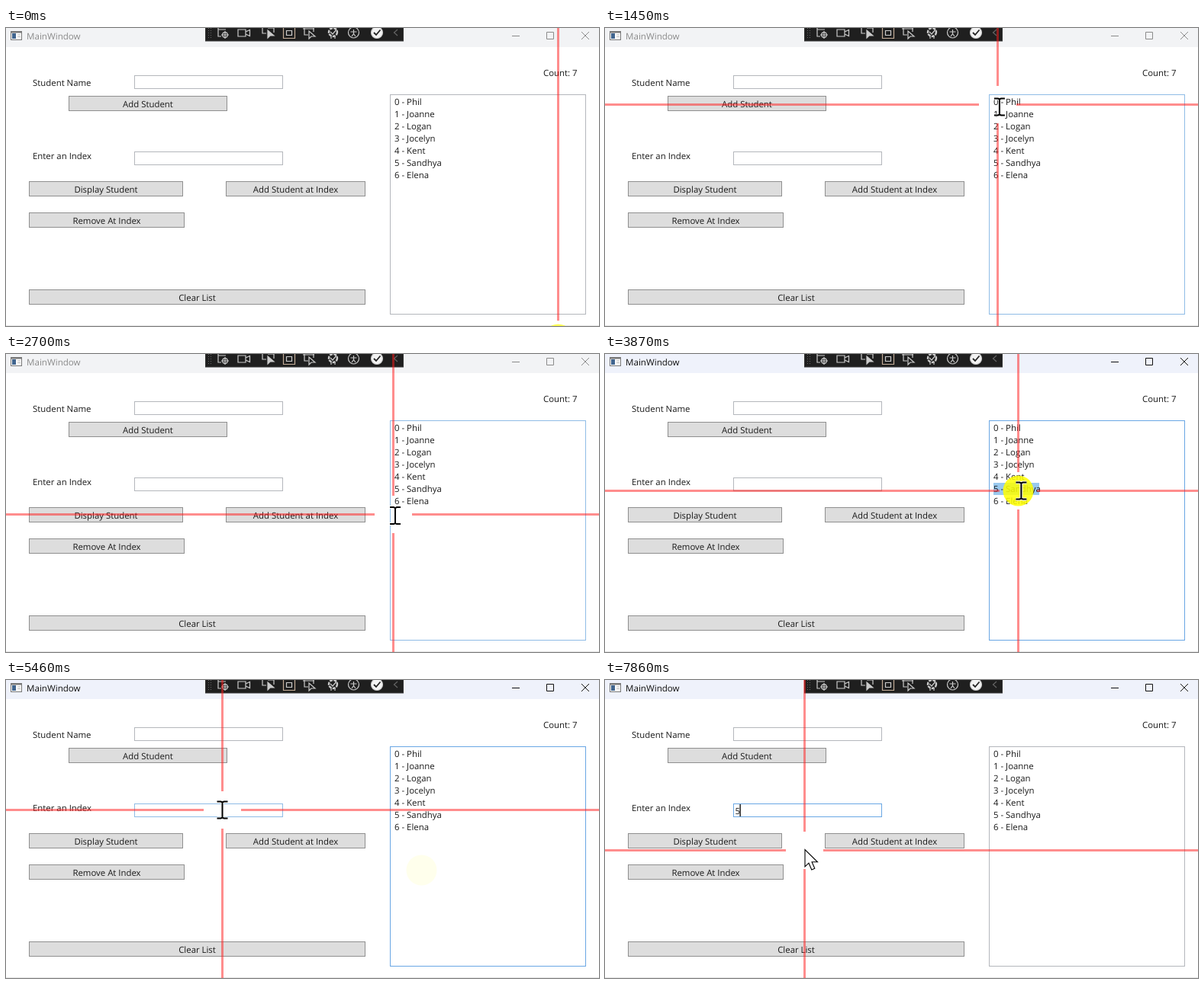
An HTML page that plays this animation: 777x391 px, repeating every 8 s.

```html
<!DOCTYPE html>
<html lang="en">
<head>
<meta charset="utf-8">
<title>Student list</title>
<style>
  html, body { margin: 0; width: 100%; height: 100%; overflow: hidden; background: #fff; }
  svg { display: block; width: 777px; height: 391px; }
  text { font: 11.4px "Open Sans", "Noto Sans", sans-serif; fill: #1a1a1a; text-rendering: geometricPrecision; }
  .box { fill: #fff; stroke: #b4b7bc; }
  .box.hover { stroke: #8fbce6; }
  .box.focus { stroke: #6aa7e4; }
  .button { fill: #ddd; stroke: #8f8f8f; }
  .button.hover { fill: #bee6fd; stroke: #5f97be; }
  .bar { fill: #f2f3f5; }
  .caption { fill: #8b8b8b; font-size: 11.6px; }
  .window { fill: none; stroke: #8b8b8b; }
  .active .bar { fill: #eff2fb; }
  .active .caption { fill: #111; }
  .active .window { stroke: #111; }
  .icons { fill: none; stroke: #cbcbcb; stroke-width: 1.2; }
</style>
</head>
<body>
<svg id="stage" viewBox="0 0 777 391">
  <defs><path id="beamShape" fill="none" d="M-7 -11H-2L0 -10L2 -11H7M0 -10V10M-7 11H-2L0 10L2 11H7"/></defs>
  <rect class="bar" width="777" height="25"/>
  <path d="M0 390.5H777" stroke="#e6e6e6"/>
  <rect x="6.5" y="4.5" width="14" height="11" fill="#fff" stroke="#777"/>
  <path d="M6 5.5H21" stroke="#777" stroke-width="2"/>
  <rect x="8" y="7" width="5" height="7" fill="#41658f"/>
  <path d="M15 9H19M15 11.5H19" stroke="#bbb"/>
  <text class="caption" x="27" y="15">MainWindow</text>
  <path class="window" d="M663 10.5h10M708.5 5.5h9v9h-9zM754 5l10 10m0 -10l-10 10"/>

  <text x="35" y="76">Student Name</text>
  <text x="35" y="172">Enter an Index</text>
  <text x="704" y="63">Count: 7</text>
  <g id="controls"></g>
  <rect id="selection" x="509" y="169" width="60" height="16" fill="#99c9ef"/>
  <g id="list"></g>
  <text id="typed" x="170.5" y="176">5</text>
  <rect id="caret" y="163" width="1.3" height="16"/>

  <rect x="261.5" y="-1" width="259" height="18" fill="#1f1f1f" stroke="#333"/>
  <path d="M265.5 0V15M268.500 0V15" stroke="#666" stroke-dasharray="1 2"/>
  <g class="icons">
    <path d="M278 0v11h4m-4 -9h10M287 4v10m-5 -5h10"/><circle cx="287" cy="9" r="3.3"/>
    <path d="M304 2h10v9h-10zm10 3l5.500 -2.500v8l-5.500 -2.500"/>
    <path d="M336 0v7h5m2 -7h8v6"/><path d="M343 3v10l3 -3h5z" fill="#cbcbcb"/>
    <path d="M363.5 -1v14.500h15v-14.500" stroke="#c4ad98"/><path d="M367.5 3.500h7v6h-7z"/>
    <path d="M389 1h15m-13 -2v10h5m7 -10v6"/><path d="M397 4v10l3 -3h5z"/>
    <circle cx="428.5" cy="5.500" r="5.500" stroke-width="2.400" stroke-dasharray="4 1.200"/>
    <path d="M425 5l3 3l5 -6m-7 9v3m5 -3v3"/>
    <circle cx="455.5" cy="6" r="7"/><path d="M451.500 5h8m-4 -3v5.500l-2.500 3.500m2.500 -3.500l2.500 3.500"/>
    <circle cx="486" cy="6" r="7.500" fill="#f3f3f3"/><path d="M482 6l3 3l5.500 -6.500" stroke="#222" stroke-width="1.800"/>
    <path d="M513 2l-4.500 4l4.500 4" stroke="#666"/>
  </g>

  <circle id="spot" r="20" fill="#ff0"/>
  <path id="cross" stroke="#ff1c1c" stroke-opacity=".5" stroke-width="3"/>
  <g id="beam">
    <use href="#beamShape" stroke="#fff" stroke-width="4"/>
    <use href="#beamShape" stroke="#000" stroke-width="2"/>
  </g>
  <path id="arrow" d="M.5 -1v22.500l5 -4.800l3.800 8.800l4 -1.700l-3.700 -8.500h7.400z" fill="#fff" stroke="#000" stroke-width="1.100"/>
</svg>
<script>
const LOOP = 8000, FRAME = 80, LAG = 45, GAP = 24.5;
const HOLD = 500, FADE = 250, BLINK = 530;
const $ = id => document.getElementById(id);
const make = (parent, tag, attrs, text = "") => {
  const el = document.createElementNS("http://www.w3.org/2000/svg", tag);
  for (const key in attrs) el.setAttribute(key, attrs[key]);
  el.textContent = text;
  return parent.appendChild(el);
};

const addControl = (kind, x, y, width, height) => {
  const el = make($("controls"), "rect", { class: kind, x: x + .5, y: y + .5, width: width - 1, height: height - 1 });
  const contains = p => p.x >= x && p.x < x + width && p.y >= y && p.y < y + height;
  return { el, kind, contains };
};
const addButton = (label, x, y, width) => {
  const button = addControl("button", x, y, width, 20);
  make($("controls"), "text", { x: x + width / 2, y: y + 14.8, "text-anchor": "middle" }, label);
  return button;
};
const nameBox = addControl("box", 168, 62, 195, 18);
const indexBox = addControl("box", 168, 162, 195, 18);
const listBox = addControl("box", 503, 87, 257, 289);
const boxes = [nameBox, indexBox, listBox];
const controls = [
  ...boxes,
  addButton("Add Student", 82, 89, 208),
  addButton("Display Student", 30, 201, 202),
  addButton("Add Student at Index", 288, 201, 183),
  addButton("Remove At Index", 30, 242, 204),
  addButton("Clear List", 30, 343, 441),
];
["Phil", "Joanne", "Logan", "Jocelyn", "Kent", "Sandhya", "Elena"].forEach((name, i) =>
  make($("list"), "text", { x: 509, y: 101 + 16 * i }, `${i} - ${name}`));

const ACTIVATE = 3460, DESELECT = 4690, FOCUS = 5870, TYPE = 6860;

// Each move starts where the one before it ended
const moves = [
  { start: 0, end: 0, x: 723, y: 408 },
  { start: 350, end: 800, x: 570, y: 185 },
  { start: 950, end: 1450, x: 514, y: 100 },
  { start: 1450, end: 1600, x: 522, y: 110 },
  { start: 1750, end: 2550, x: 508, y: 200 },
  { start: 2630, end: 2700, x: 507, y: 210 },
  { start: 2700, end: 3380, x: 545, y: 233 },
  { start: 3400, end: ACTIVATE, x: 509, y: 179 },
  { start: 3630, end: 3870, x: 541, y: 179 },
  { start: 3870, end: 4160, x: 566, y: 179 },
  { start: 4450, end: DESELECT, x: 544, y: 249 },
  { start: DESELECT, end: 5460, x: 283, y: 170 },
  { start: 5770, end: 5850, x: 282, y: 168 },
  { start: 5930, end: 6320, x: 176, y: 245 },
  { start: 6320, end: 6490, x: 161, y: 236 },
  { start: TYPE, end: 7170, x: 261, y: 223 },
];
const clicks = [
  { press: -500, release: -440, opacity: .65 },
  { press: ACTIVATE, release: 4310, opacity: .85 },
  { press: DESELECT, release: DESELECT + 50, opacity: .65 },
  { press: FOCUS, release: FOCUS + 30, opacity: .67 },
];

// The crosshair advances frame by frame; the pointer runs slightly ahead of it
function locate(time, lead = 0) {
  const t = time + 10;
  const i = Math.max(0, moves.findLastIndex(m => m.start <= t));
  const to = moves[i], from = moves[i - 1] ?? to;
  const duration = to.end - to.start;
  const steps = Math.max(1, Math.round(duration / FRAME));
  const done = duration ? Math.floor((t - to.start) / duration * steps) / steps + lead / duration : 1;
  const k = Math.min(1, done);
  return { x: from.x + (to.x - from.x) * k + .5, y: from.y + (to.y - from.y) * k + .5 };
}

const show = (el, on) => el.setAttribute("visibility", on ? "visible" : "hidden");
const moveTo = (el, p) => el.setAttribute("transform", `translate(${p.x} ${p.y})`);

function drawCross(t) {
  const at = locate(t);
  const x = Math.floor(at.x) + .5, y = Math.floor(at.y) + .5;
  $("cross").setAttribute("d", `M0 ${y}H${x - GAP}M${x + GAP} ${y}H777M${x} 0V${y - GAP}M${x} ${y + GAP}V391`);
}

function drawSpot(t) {
  const click = clicks.findLast(c => c.press <= t);
  const faded = Math.max(0, (t - click.release - HOLD) / FADE);
  $("spot").setAttribute("opacity", click.opacity * Math.max(0, 1 - faded));
  moveTo($("spot"), locate(Math.min(t, click.release)));
}

function drawControls(t, pointer) {
  const focused = t >= FOCUS ? indexBox : t >= ACTIVATE ? listBox : null;
  for (const c of controls) {
    const state = c === focused ? " focus" : c.contains(pointer) ? " hover" : "";
    c.el.setAttribute("class", c.kind + state);
  }
  $("stage").setAttribute("class", t >= ACTIVATE ? "active" : "");
  show($("selection"), t >= 3780 && t < DESELECT);

  const typed = t >= TYPE;
  const sinceInput = t - (typed ? TYPE : FOCUS) + 60;
  show($("typed"), typed);
  show($("caret"), t >= FOCUS && Math.floor(sinceInput / BLINK) % 2 === 0);
  $("caret").setAttribute("x", typed ? 176.5 : 170);
}

function draw(t) {
  const pointer = locate(t, LAG);
  drawCross(t);
  drawSpot(t);
  drawControls(t, pointer);

  const overText = boxes.some(box => box.contains(pointer));
  show($("beam"), overText);
  show($("arrow"), !overText);
  moveTo($("beam"), pointer);
  moveTo($("arrow"), pointer);
}

const begin = performance.now();
function tick() {
  draw((performance.now() - begin) % LOOP);
  requestAnimationFrame(tick);
}
tick();
</script>
</body>
</html>
```
